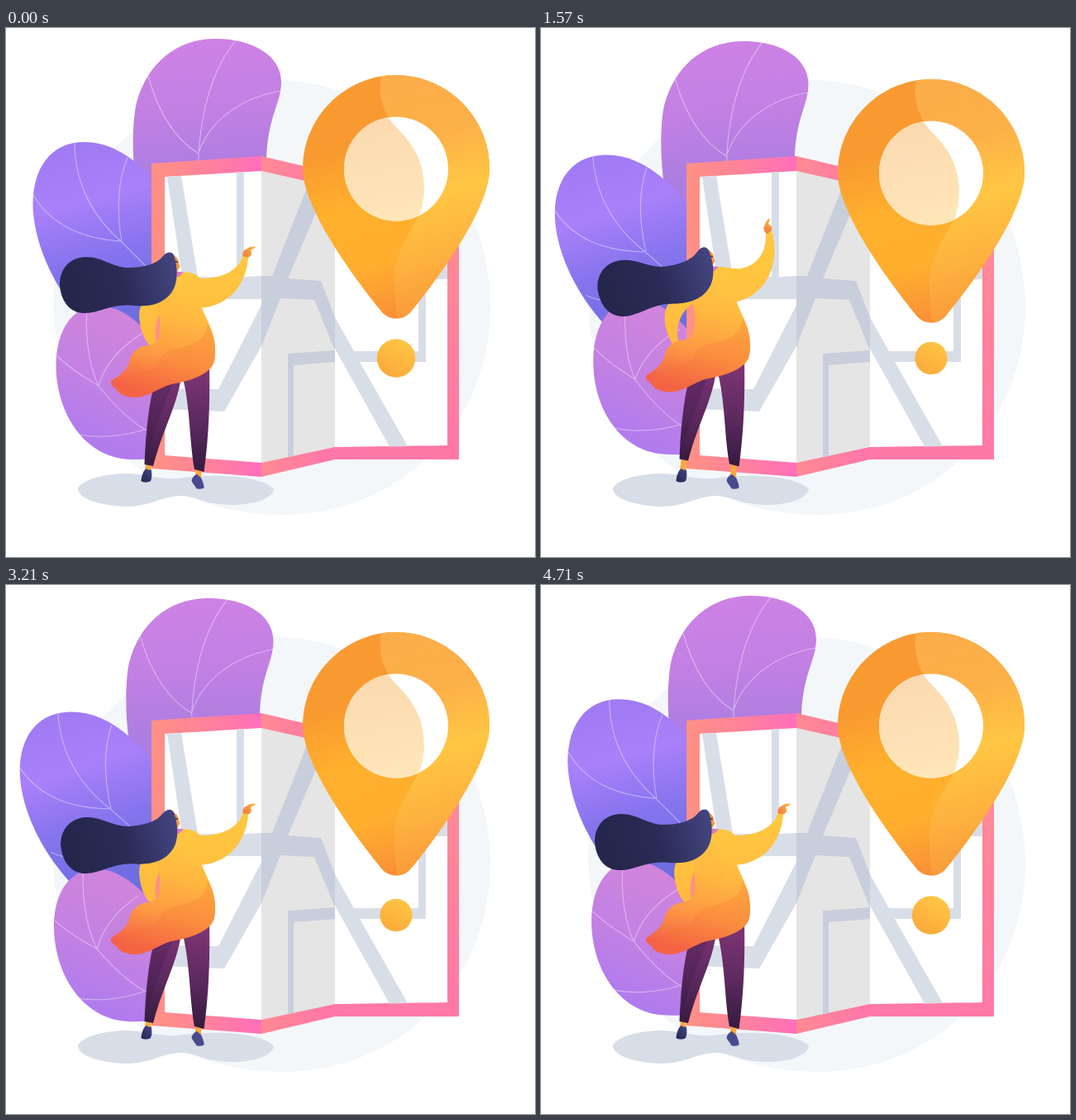
An HTML page for the animation above (4780 ms loop, 640x640 px).

```html
<!DOCTYPE html>
<html lang="en">
<head>
<meta charset="utf-8">
<title>Map and location pin</title>
<style>
html, body { margin: 0; width: 100%; height: 100%; overflow: hidden; background: #fff; }
svg { display: block; width: 100vw; height: 100vh; }
.vein { fill: none; stroke: #fff; stroke-opacity: .42; stroke-width: 1.1; }
</style>
</head>
<body>
<svg viewBox="0 0 640 640" xmlns="http://www.w3.org/2000/svg">
  <defs>
    <g id="grads"></g>
    <clipPath id="pinClip"><path d="M472 57C534 57 585 108 585 170C585 217 526 299 489 344C480 354 464 354 455 344C418 299 359 217 359 170C359 108 410 57 472 57Z"/></clipPath>
    <clipPath id="holeClip"><circle cx="472" cy="170.500" r="63"/></clipPath>
  </defs>

  <path fill="#f3f7fa" d="M57 330C57 183 176 63 325 63C468 63 586 190 586 337C586 478 478 589 334 589C180 589 57 475 57 330Z"/>

  <g id="leafTop">
    <path fill="url(#gTop)" d="M168 235C150 185 152 115 158 90C171 43 206 13 253 13C301 13 333 35 333 65C333 92 317 105 315 158L314 200Z"/>
    <path class="vein" d="M233 162V151C236 110 245 55 278 15M233 152C205 135 185 105 172 58M233 151C245 115 280 85 333 76"/>
  </g>
  <g id="leafMid">
    <path fill="url(#gMid)" d="M230 260C190 190 150 138 94 138C54 138 32.500 170 32.500 213C32.500 261 64 360 190 430Z"/>
    <path class="vein" d="M83 139C83 195 112 235 139 258L172 291M33 202C55 240 95 255 139 258M147 157C133 190 135 230 140 258M64 306C85 318 125 322 172 291"/>
  </g>
  <g id="leafLow">
    <path fill="url(#gLow)" d="M112 336C79 336 60.500 368 60.500 408C60.500 468 97 522 153 522C172 522 188 521 200 518V400C170 365 145 336 112 336Z"/>
    <path class="vein" d="M98 341C95 380 103 415 112 433C130 455 150 475 167 485L180 492M62 397C80 415 100 425 112 433C120 405 140 385 164 370M88 492C115 497 145 493 167 486"/>
  </g>

  <path fill="#d7dee8" d="M87 557C93 545 122 539 147 539C172 540 185 546 205 545C228 543 240 541 264 542C296 543 318 550 324 558C322 570 298 577 273 577C240 577 232 566 211 566C186 567 175 579 145 579C115 578 87 570 87 557Z"/>

  <g id="map">
    <path fill="url(#gMapL)" d="M176 164L309 155V543L176 533Z"/>
    <path fill="url(#gMapC)" d="M309 155L398 176V522L309 543Z"/>
    <path fill="url(#gMapR)" d="M398 176L548 172V522H398Z"/>
    <path fill="#fff" d="M192 180L309 173V526L192 517ZM398 193L534 189V505L398 507Z"/>
    <path fill="#e5e5e5" d="M309 173L398 193V507L309 526Z"/>
    <path fill="#d8dee8" d="M195 180L212 179L232 301H279V174.500L288 174V301L309 300V328H217ZM192 436L257 437L309 335V385L264 464L192 461Z"/>
    <path fill="#c8cedb" d="M309 300L322 300L367 186L389 190L341 303L381 306L398 350V390L373 329L332 327L309 385V335L309 328ZM341 394L398 390V404L348 408V517.500L341 519Z"/>
    <path fill="#d8dee8" d="M398 350L421 391H499V280H534V304H508V404H428L486 506L464 506.500L398 388Z"/>
  </g>

  <circle id="dot" cx="472" cy="399.500" r="23" fill="url(#gDot)"/>
  <g id="pin">
    <g clip-path="url(#pinClip)">
      <path fill="url(#gPinA)" d="M350 50H600V360H350Z"/>
      <path fill="url(#gPinB)" d="M455 50C449 80 455 101 472 120C494 142 506 162 506 196C505 240 470 255 470 305C470 330 473 348 475 360H600V50Z"/>
    </g>
    <circle cx="472" cy="170.500" r="63" fill="#fff"/>
    <path clip-path="url(#holeClip)" fill="url(#gHole)" d="M400 90H456C457 102 463 110 472 120C494 142 506 162 506 196C505 215 500 228 494 240H400Z"/>
  </g>

  <g id="feet">
    <path fill="#fba63e" d="M170 518H177L175 537H168ZM230 525H237L236 546L229 544Z"/>
    <path fill="url(#gShoe)" d="M163.500 548C164 541 167 534 170 533C172 535 174 535 175.500 534C177 539 176.500 545 175 548C172 550 166 550 163.500 548ZM224.500 547C226 543 229 540 231 540C233 542 235 543 236.500 545C238 549 240 553 239.500 556.500C236 558 232 558 230 557C229 553 225 551 224.500 547Z"/>
  </g>
  <g id="body">
    <path fill="url(#gLegs)" d="M213 420L246 405C247 458 245 497 239.500 537L228 534C222 505 223 455 213 420ZM181 425L212 420C209 453 188 490 178 530L167.500 528C169 490 173 450 181 425Z"/>
    <path fill="#2f1640" opacity=".22" d="M181 428L203 425C192 455 181 480 171 516C170 485 174 450 181 428Z"/>
    <path id="armL" fill="url(#gArm)"/>
    <path fill="url(#gTorso)" d="M205 299C212 294 226 294 234 302L237 339C244 356 253 370 253 388C254 403 250 410 245 414C233 424 216 428 200 431C185 435 172 447 155 447C143 446 135 442 134 437C130 435 126 431 127 427C136 421 146 415 149 404C151 394 157 388 166 385C174 383 180 383 183 379C188 367 188 350 180 330Z"/>
    <path fill="#f56f35" opacity=".27" d="M244 357C243 380 222 385 203 389C180 394 191 411 168 414C150 416 146 431 131 434L134 437C135 442 143 446 155 447C172 447 185 435 200 431C216 428 233 424 245 414C250 410 254 403 253 388C253 376 249 367 244 357Z"/>
    <path id="armR" fill="url(#gArm)"/>
    <path id="hand" fill="url(#gHand)" d="M-3.500 0C-4 -5 -2 -8 2 -9C5 -11.500 9 -12 12 -11C12 -9.500 8 -9 6 -7C8 -3 7 0 3 1.500Z"/>
    <path fill="#d979bd" d="M204 294L215 295.500L209 301L202 300Z"/>
    <path fill="#f79a3f" d="M200 274C206 276 209 280 209 284L210.500 289C209 291 209 292 207 294L200 297Z"/>
    <path fill="#33315f" d="M203 281L208 282.500L207.500 284L203 283Z"/>
    <path id="hair" fill="url(#gHair)" d="M204 277C202 270 195 270 190 276C182 286 166 290 147 290C128 289 116 277 97 277C77 277 65 292 65 310C66 330 77 345 95 345C113 345 128 334 150 335.500C172 338 190 335 201 319C208 308 208 292 204 277Z"/>
  </g>
</svg>
<script>
const LOOP = 4780, STEP = LOOP / 67;
const $ = id => document.getElementById(id);

// id: x1 y1 x2 y2, then evenly spaced colours
const grads = {
  gTop: [240, 13, 250, 180, '#cd82e4', '#c380e3', '#ab7de1'],
  gMid: [75, 140, 130, 345, '#a07af3', '#a980fa', '#8674ed', '#6f6de2'],
  gLow: [155, 355, 88, 512, '#d084dc', '#c281e3', '#ad7af0'],
  gMapL: [176, 300, 309, 300, '#ff9184', '#ff829a', '#ff6ebc'],
  gMapC: [309, 300, 398, 300, '#ff8a92', '#ff75ab'],
  gMapR: [480, 250, 470, 522, '#ff8a94', '#ff78a8'],
  gPinA: [420, 70, 500, 345, '#f99a32', '#f99a30', '#ffb02d', '#ffae2e', '#f98e38'],
  gPinB: [470, 65, 545, 340, '#fbad49', '#fcb048', '#ffc643', '#fdb33f', '#f99939'],
  gHole: [445, 107, 470, 234, '#fbd9b0', '#ffe6b8'],
  gDot: [460, 420, 482, 380, '#fba93b', '#ffc544'],
  gShoe: [165, 550, 180, 535, '#25274f', '#474b8e'],
  gLegs: [215, 415, 208, 537, '#7d3474', '#5d2a60', '#331a3d'],
  gTorso: [222, 305, 185, 445, '#ffc642', '#ffb840', '#fd9a43', '#f36048'],
  gArm: [220, 285, 225, 400, '#ffc740', '#ffc03f', '#ffb63e'],
  gHand: [-2, 0, 12, -11, '#f0803c', '#fdb73f'],
  gHair: [80, 315, 206, 290, '#25264c', '#2b2c57', '#434580']
};
$('grads').innerHTML = Object.entries(grads).map(([id, [x1, y1, x2, y2, ...cols]]) =>
  `<linearGradient id="${id}" gradientUnits="userSpaceOnUse" x1="${x1}" y1="${y1}" x2="${x2}" y2="${y2}">` +
  cols.map((c, i) => `<stop offset="${i / (cols.length - 1)}" stop-color="${c}"/>`).join('') +
  '</linearGradient>').join('');

const armL = [
  'M168 331C160 336 160 348 163 362C165 371 169 379 174 384L182 380C178 368 183 352 187 342L186 330Z',
  'M166 332C145 339 141 352 144 372C146 380 149 386 150 391L158 389C154 374 157 352 180 340L186 330Z'
];
const armR = [
  'M212 297C222 294 230 298 234 303C252 304 280 298 287 275L293 277C292 300 278 336 234 339L212 330Z',
  'M212 297C224 295 235 298 241 296C264 293 272 271 267 247L275 245C288 279 278 328 234 338L212 330Z'
];

const lerp = (a, b, k) => a + (b - a) * k;
const wave = x => (1 - Math.cos(x)) / 2;
const num = /-?\d+(\.\d+)?/g;

// Blend two paths of equal structure
function blend([a, b], k) {
  const to = b.match(num);
  let i = 0;
  return a.replace(num, n => lerp(+n, +to[i++], k).toFixed(2));
}

// Eased value along [time, value] keys
function keyed(t, keys) {
  for (let i = 1; i < keys.length; i++) {
    const [t0, v0] = keys[i - 1], [t1, v1] = keys[i];
    if (t < t1) return lerp(v0, v1, wave(Math.PI * (t - t0) / (t1 - t0)));
  }
  return keys[keys.length - 1][1];
}

const move = (id, v) => $(id).setAttribute('transform', v);
const turn = (id, deg, x, y) => move(id, `rotate(${deg} ${x} ${y})`);

function draw(t) {
  const a = 2 * Math.PI * t / LOOP;
  const sway = wave(2 * a);
  const reach = keyed(t, [[0, 0], [1150, 1], [2450, 0]]);
  const bend = keyed(t, [[0, 0], [1000, 1], [2400, 0]]);

  turn('leafTop', -1.15 * wave(a), 450, 710);
  turn('leafMid', -4.5 * sway, 342, 477);
  turn('leafLow', -2.25 * Math.sin(2 * a), 342, 488);

  $('dot').setAttribute('r', 23.2 - 4.6 * sway);
  move('pin', `translate(0 ${keyed(t, [[0, 0], [1350, 6], [2300, -2], [3050, 0]])})`);

  move('body', `translate(0 ${-8.5 * reach})`);
  $('armL').setAttribute('d', blend(armL, bend));
  $('armR').setAttribute('d', blend(armR, reach));
  move('hand', `translate(${lerp(290, 271, reach)} ${lerp(276, 246, reach)}) rotate(${-56 * reach})`);
  turn('hair', -2.9 * sway - 5.7 * bend, 198, 282);
}

const start = performance.now();
function tick() {
  const t = (performance.now() - start) % LOOP;
  draw(Math.floor((t + 5) / STEP) * STEP % LOOP);
  requestAnimationFrame(tick);
}
draw(0);
requestAnimationFrame(tick);
</script>
</body>
</html>
```
